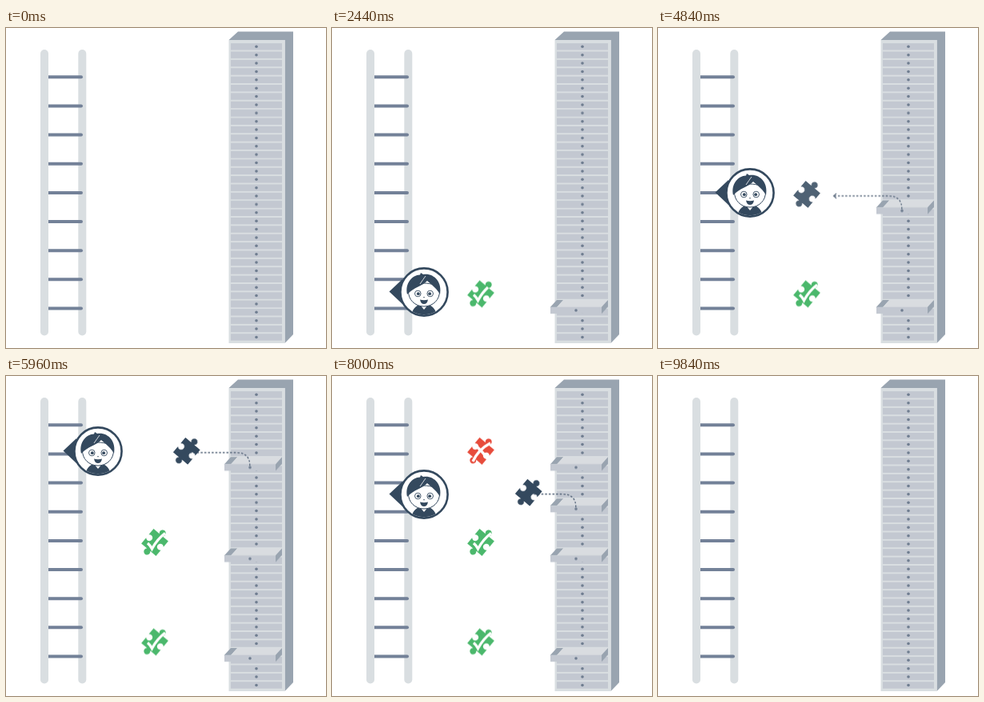
An HTML page that plays this animation: 400x400 px, repeating every 10000 ms.

```html
<!DOCTYPE html>
<html lang="en">
<head>
<meta charset="utf-8">
<title>Ladder and drawers</title>
<style>
  html, body { margin: 0; width: 100%; height: 100%; overflow: hidden; background: #fff; }
  svg { display: block; width: 100vw; height: 100vh; }
  .rail { fill: #d9dee1; }
  .rung { stroke: #738198; stroke-width: 4; stroke-linecap: round; }
  .shade { fill: #99a4b0; }
  .row { fill: #c3c8d1; }
  .lid { fill: #d9dce0; }
  .knob { fill: #6f7d90; }
  .dark { fill: #34495e; }
  .good { fill: #4bb86c; }
  .bad { fill: #e74c3c; }
  .white { fill: #fff; }
  .line { fill: none; stroke: #34495e; }
  .trail { fill: none; stroke: #56667a; stroke-width: 1.3; }
  .dash { stroke-dasharray: 2.6 2; }
  .mark { fill: none; stroke: #fff; stroke-width: 3.4; stroke-dasharray: 1 2; }
</style>
</head>
<body>
<svg viewBox="0 0 400 400">
  <defs>
    <path id="piece" transform="rotate(40)" d="M-12-12H-2.5a4 4 0 1 1 5 0H12V-2.5a4 4 0 1 0 0 5V12H2.5a4 4 0 1 1-5 0H-12V2.5a4 4 0 1 0 0-5Z"/>
    <clipPath id="disc"><circle r="28.3"/></clipPath>
  </defs>

  <g id="ladder">
    <rect class="rail" x="90.3" y="27" width="10" height="357.5" rx="5"/>
  </g>

  <g id="cabinet">
    <path class="shade" d="M278.5 15L290 4.5H359V383L348.5 394V15Z"/>
    <rect class="rail" x="278.5" y="15" width="70" height="379"/>
  </g>

  <g id="scene">
    <g id="drawers"></g>
    <g id="probes"></g>
    <g id="avatar">
      <path class="dark" d="M-43.5-.5L-27-16V15Z"/>
      <circle class="white" r="29.6"/>
      <circle class="line" r="29.6" stroke-width="2.6"/>
      <g clip-path="url(#disc)">
        <path class="dark" d="M-16 30C-15 22-11 18-6 16H6C11 18 15 22 16 30Z"/>
        <path class="white" d="M-5 16L0 22L5 16Z"/>
        <path class="white" stroke="#34495e" stroke-width="1" d="M-19.5-2C-20 10-11 18 0 18S20 10 19.5-2C17-14-17-14-19.5-2Z"/>
        <path class="dark" d="M-21 3C-24-11-15-21-5-21.5L-4-24L-1-22C12-24 23-13 20 3C17-3 11-8 4-14C-1-8-13-6-21 3Z"/>
        <path class="line" style="stroke:#fff" d="M2-20Q-1-16-5-10" stroke-width=".8"/>
        <g id="eyes"></g>
        <path class="dark" d="M-5 9.5Q0 11 5 9.5Q4 15 0 15T-5 9.5Z"/>
        <path class="line" d="M-1 6.5Q0 7.3 1 6.5" stroke-width=".8"/>
      </g>
    </g>
  </g>
</svg>

<script>
const LOOP = 10000;
const sheet = document.head.appendChild(document.createElement('style'));
const $ = id => document.getElementById(id);
const add = (id, html) => $(id).insertAdjacentHTML('beforeend', html);

// Each step is [ms, declarations, easing towards the next step].
function animate(id, steps) {
  const first = [0, steps[0][1]];
  const last = [LOOP, steps[steps.length - 1][1]];
  const body = [first, ...steps, last].map(([ms, css, ease = 'linear']) =>
    `${ms / LOOP * 100}%{${css};animation-timing-function:${ease}}`).join('');
  sheet.append(`@keyframes ${id}{${body}}#${id}{animation:${id} ${LOOP}ms linear infinite}`);
}
const fade = (id, from, to, start, end) =>
  animate(id, [[start, `opacity:${from}`], [end, `opacity:${to}`]]);

// Still parts
for (let i = 0; i < 9; i++) {
  const y = 61.3 + i * 36.15;
  add('ladder', `<path class="rung" d="M50 ${y}H94"/>`);
}
add('ladder', '<rect class="rail" x="43" y="27" width="10" height="357.5" rx="5"/>');

const rowY = i => 23.3 + i * 10.375;
const front = '<rect class="row" y="-4.2" width="64" height="8.4"/><circle class="knob" cx="32" r="1.8"/>';
for (let i = 0; i < 36; i++)
  add('cabinet', `<g transform="translate(281 ${rowY(i)})">${front}</g>`);

for (const x of [-7.7, 7.7])
  add('eyes', `<circle class="white" cx="${x}" cy="2" r="3.8" stroke="#34495e" stroke-width=".9"/>
    <circle class="dark" cx="${x * .93}" cy="2.2" r="1.9"/>`);

// Drawers slide out towards the lower left
function drawer(n, y, start) {
  add('drawers', `<g transform="translate(281 ${y})">
    <g transform="translate(0 -5) skewX(-42)"><g id="lid${n}">
      <rect class="lid" width="64" height="9"/><rect class="shade" width="8" height="9"/></g></g>
    <g transform="translate(64 -5) skewY(-48)">
      <rect id="side${n}" class="shade" x="-8" width="8" height="8.4"/></g>
    <g id="front${n}">${front}</g></g>`);
  const open = (id, a, b) =>
    animate(id + n, [[start, `transform:${a}`, 'ease-out'], [start + 320, `transform:${b}`]]);
  open('lid', 'scaleY(0)', 'scaleY(1)');
  open('side', 'scaleX(0)', 'scaleX(1)');
  open('front', 'translate(0,0)', 'translate(-8px,8px)');
}

const marks = {
  good: ['M-9 1Q-5.5 4-3.5 8Q3-4 13-11.5'],
  bad: ['M-10-9Q1-2 10 12', 'M12-10Q-3-2-10 13']
};

// A piece leaves its drawer, leaves a dashed trail and gets a verdict
function probe(n, y, start, verdict, kind, span) {
  const end = start + 580, go = start + 108;
  const strokes = marks[kind].map((d, i) =>
    `<path id="mark${n}${i}" class="mark" pathLength="1" d="${d}"/>`).join('');
  add('probes', `<g transform="translate(0 ${y})">
    <clipPath id="clip${n}"><rect id="reveal${n}" y="-40" width="400" height="60"/></clipPath>
    <g id="trail${n}"><g clip-path="url(#clip${n})">
      <path class="trail dash" d="M304.8-2C305-13 299-18.5 288-18.5H219.5"/>
      <path class="trail" d="M223-21.5L219.5-18.5L223-15.5"/></g></g>
    <g transform="translate(0 -20.5)"><g id="move${n}">
      <g id="tint${n}"><use href="#piece" class="${kind}"/>${strokes}</g>
      <g id="plain${n}"><use href="#piece" class="dark"/></g></g></g></g>`);
  animate('move' + n, [
    [start, 'transform:translateX(304px) scale(0)', 'ease-out'],
    [go, 'transform:translateX(304px) scale(1)'],
    [end, 'transform:translateX(186px) scale(1)']]);
  animate('reveal' + n, [
    [go, 'transform:translateX(304px)'],
    [end, 'transform:translateX(186px)']]);
  animate('trail' + n, [
    [start, 'opacity:0'], [go, 'opacity:1'],
    [verdict, 'opacity:1'], [verdict + 240, 'opacity:0']]);
  fade('plain' + n, 1, 0, verdict, verdict + 160);
  fade('tint' + n, 0, 1, verdict + 100, verdict + 300);
  const each = (span - 280) / marks[kind].length;
  marks[kind].forEach((d, i) => {
    const t = verdict + 280 + i * each;
    animate(`mark${n}${i}`, [
      [t, 'stroke-dashoffset:1.1', 'ease-in-out'],
      [t + each, 'stroke-dashoffset:0']]);
  });
}

[
  [31, 440, 1020, 1820, 'good', 740],
  [19, 3360, 3980, 4820, 'good', 700],
  [8, 5240, 5540, 6380, 'bad', 580],
  [13, 7240, 7660, 8500, 'good', 580]
].forEach(([row, open, start, verdict, kind, span], n) => {
  drawer(n, rowY(row), open);
  probe(n, rowY(row) + 8, start, verdict, kind, span);
});

// Avatar pops in, then climbs with a small overshoot
const at = (y, s = 1) => `transform:translate(115px,${y}px) scale(${s})`;
const climb = (t, from, over, to) => [
  [t, at(from), 'ease-in-out'],
  [t + 290, at(over), 'ease-in-out'],
  [t + 450, at(to)]];
animate('avatar', [
  [220, at(330, 0), 'ease-out'],
  [440, at(330, 1.1), 'ease-in-out'],
  [600, at(330)],
  ...climb(3020, 330, 197.5, 206),
  ...climb(4900, 206, 88, 94),
  ...climb(6900, 94, 155, 148)]);

fade('scene', 1, 0, 9580, 9830);
</script>
</body>
</html>
```
